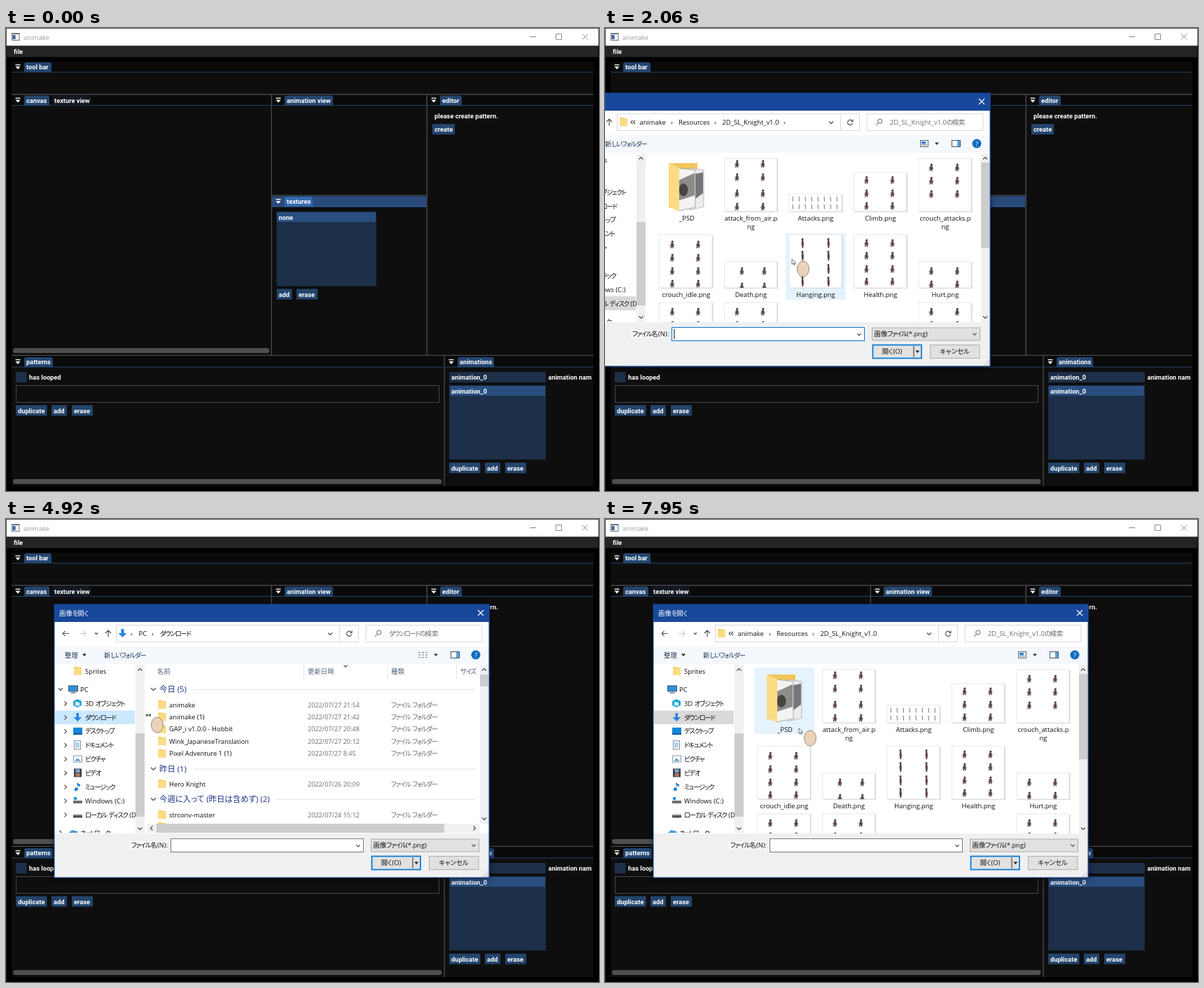
These frames come from a looping animation (847 by 661 pixels, 8000 ms). An HTML page:

```html
<!DOCTYPE html>
<html lang="ja">
<head>
<meta charset="utf-8">
<title>animake</title>
<style>
html, body { margin: 0; width: 100%; height: 100%; overflow: hidden; background: #000; }
svg#stage { display: block; width: 100vw; height: 100vh; }
text { font: 9.4px 'Open Sans', 'Noto Sans CJK JP', 'Noto Sans CJK', sans-serif; font-feature-settings: 'palt'; fill: #111; white-space: pre; }
.ui text { font: 600 9.25px Roboto, sans-serif; fill: #fff; }
.kana { letter-spacing: -1.2px; }
.group .kana, .mid .kana { letter-spacing: 0; }
text.grey { fill: #6d6d6d; }
text.date { fill: #6d6d6d; font-size: 9.1px; }
text.head { fill: #4c607a; }
text.group { fill: #1e3287; font-size: 11.4px; }
text.bar { fill: #1e395b; }
text.white { fill: #fff; }
.mid { text-anchor: middle; }
.end { text-anchor: end; }
.line { fill: none; stroke: #444; stroke-width: 1.1; }

.step { animation: 8s step-end infinite; }
.off { opacity: 0; }
#cursor { animation: travel 8s ease-in-out infinite; }
#drag { animation: drag 8s ease-in-out infinite; }
#dialog { transform-origin: 379.5px 317px; animation: open 8s linear infinite; }
#pointer { animation-name: appear; }
#ring { animation-name: press; }
#arrow { animation-name: arrow; }
#resize { animation-name: resize; }
#addHover { animation-name: addHover; }
#content { animation-name: content; }
#thumbs, #scroll { animation-name: thumbs; }
#details { animation-name: details; }
#downloads { animation-name: downloads; }
#animake { animation-name: animake; }
#resources { animation-name: resources; }
#tile { animation-name: tile; }
#row { animation-name: row; }
#caret { animation-name: caret; }
#field { animation-name: field; }
#disk, #trail { animation-name: leave; }
#dlRow { animation-name: dlRow; }
#chevrons { animation-name: chevrons; }
.load0 { animation-name: load0; }
.load1 { animation-name: load1; }
.load2 { animation-name: load2; }

@keyframes travel {
  0%, 3.25% { transform: translate(748px, 625px); }
  11.5%, 23.75% { transform: translate(402px, 384px); }
  25.75% { transform: translate(267px, 330px); }
  28.5% { transform: translate(30px, 276px); }
  32%, 34.5% { transform: translate(78px, 300px); }
  39%, 42% { transform: translate(92px, 105px); }
  43.125% { transform: translate(101px, 105px); }
  44% { transform: translate(127px, 112px); }
  49%, 51% { transform: translate(232px, 134px); }
  54.5% { transform: translate(150px, 240px); }
  56.5%, 58.5% { transform: translate(140px, 283px); }
  61.5% { transform: translate(200px, 280px); }
  67%, 70% { transform: translate(250px, 266px); }
  74.5%, 78% { transform: translate(252px, 243px); }
  84% { transform: translate(262px, 253px); }
  86.5%, 89% { transform: translate(262px, 244px); }
  96%, 100% { transform: translate(277px, 299px); }
}
@keyframes drag {
  0%, 42% { transform: translate(-140px, -29px); }
  43.125% { transform: translate(-131px, -29px); }
  44% { transform: translate(-105px, -22px); }
  49%, 100% { transform: none; }
}
@keyframes open {
  0%, 17.5% { opacity: 0; transform: scale(.95); }
  18.875% { opacity: .75; transform: scale(.987); }
  20%, 100% { opacity: 1; transform: scale(1); }
}
@keyframes appear { 3.25% { opacity: 1; } }
@keyframes press {
  13.5% { opacity: .75; } 14.75% { opacity: 0; }
  40.6% { opacity: .75; } 50.6% { opacity: 0; }
  56.75% { opacity: .75; } 58% { opacity: 0; }
  67.25% { opacity: .75; } 69% { opacity: 0; }
  76% { opacity: .75; } 77.75% { opacity: 0; }
  87% { opacity: .75; } 88.75% { opacity: 0; }
}
@keyframes arrow { 60.8% { opacity: 0; } 62.3% { opacity: 1; } }
@keyframes resize { 60.8% { opacity: 1; } 62.3% { opacity: 0; } }
@keyframes addHover { 11.2% { opacity: 1; } }
@keyframes content { 21.25% { opacity: 1; } }
@keyframes thumbs { 58.75% { opacity: 0; } 90% { opacity: 1; } }
@keyframes details { 58.75% { opacity: 1; } 90% { opacity: 0; } }
@keyframes downloads { 58.75% { opacity: 1; } 70.625% { opacity: 0; } }
@keyframes animake { 70.625% { opacity: 1; } 78.75% { opacity: 0; } }
@keyframes resources { 78.75% { opacity: 1; } 90% { opacity: 0; } }
@keyframes tile {
  23.125% { opacity: 1; transform: translate(277.5px, 110px); }
  24.5% { transform: translate(185px, 110px); }
  26.5% { transform: translate(92.5px, 110px); }
  27.25% { transform: translate(0, 110px); }
  28% { opacity: 0; }
  31.5% { opacity: 1; }
  35% { opacity: 0; }
  93.5% { opacity: 1; transform: none; }
}
@keyframes row {
  64.4% { opacity: 1; transform: translateY(23px); }
  70.625% { opacity: 0; transform: none; }
  71.3% { opacity: 1; }
  83% { transform: translateY(17.4px); }
  85.5% { transform: none; }
  90% { opacity: 0; }
}
@keyframes caret { 23.125% { opacity: 1; } 29.75% { opacity: 0; } 36.375% { opacity: 1; } 43% { opacity: 0; } }
@keyframes field { 57% { stroke: #7a7a7a; } }
@keyframes leave { 57% { opacity: 0; } }
@keyframes dlRow { 57% { opacity: 1; fill: #cce8ff; } 67.5% { fill: #d9d9d9; } }
@keyframes chevrons { 53% { opacity: 1; } 74.5% { opacity: 0; } }
@keyframes load0 { 58.75% { opacity: 0; } 96.75% { opacity: 1; } }
@keyframes load1 { 58.75% { opacity: 0; } 97.6% { opacity: 1; } }
@keyframes load2 { 58.75% { opacity: 0; } 98.5% { opacity: 1; } }
</style>
</head>
<body>
<svg id="stage" viewBox="0 0 847 661">
  <defs>
    <g id="folder"><path d="M0 0h5l1 1h5v11H0z" fill="#f5cd62"/><path d="M0 2h11v10H0z" fill="#fbdc85"/></g>
    <g id="knight">
      <path d="M-1.5-2.500h3l1 3.500-1 4.500h-1l-.5-2.500-1.500 2.500h-1z" fill="#5a4a4e"/>
      <circle cx=".3" cy="-4" r="1.6" fill="#3d3c44"/>
      <path d="M-1.500-1l-1.500 3" stroke="#a8504a"/>
      <path d="M1.500 0l2.500 2" stroke="#9a9ea6" stroke-width=".8"/>
    </g>
    <g id="tall">
      <path d="M-1-4h2.200l.8 5-.8 6h-1.700l-1-6z" fill="#5a4a4e"/>
      <circle cy="-5.500" r="1.500" fill="#3d3c44"/>
      <path d="M1.500-1v4" stroke="#a8504a" stroke-width=".8"/>
    </g>
    <g id="slim"><path d="M0-3.500L.5 3.500" stroke="#77747b"/></g>
    <clipPath id="navClip"><path d="M70 207h115v241H70z"/></clipPath>
    <clipPath id="listClip"><path d="M199 207h490v242H199z"/></clipPath>
    <clipPath id="rowsClip"><path d="M199 229h478v206H199z"/></clipPath>
  </defs>
  <g id="app" class="ui"></g>
  <g id="drag"><g id="dialog"></g></g>
  <g id="cursor"><g id="pointer" class="step off">
    <circle id="ring" class="step off" r="10" fill="#e3d829"/>
    <ellipse cx="16" cy="14" rx="8.5" ry="11" fill="#ead3ba" stroke="#8b6c64" stroke-width=".8"/>
    <path id="arrow" class="step" d="M0 0v7.6l1.9-1.7 1.3 2.6 1.1-.6-1.2-2.4 2.5-.3z" fill="#fff" stroke="#333" stroke-width=".7"/>
    <path id="resize" class="step off" d="M0 0h7M2-2L0 0 2 2M5-2L7 0 5 2" fill="none" stroke="#222"/>
  </g></g>
</svg>
<script>
const $ = id => document.getElementById(id);
const rect = (x, y, w, h, fill, more = '') => `<rect x="${x}" y="${y}" width="${w}" height="${h}" fill="${fill}" ${more}/>`;
const tighten = s => s.replace(/[ぁ-ー]+/g, run => `<tspan class="kana">${run}</tspan>`);
const text = (x, y, s, cls = '') => `<text x="${x}" y="${y}" class="${cls}">${tighten(s)}</text>`;
const line = (d, more = '') => `<path class="line" d="${d}" ${more}/>`;
const tri = (x, y, c = '#222') => `<path d="M${x - 3} ${y - 1.5}h6l-3 3.5z" fill="${c}"/>`;
const down = (x, y, s = 3) => line(`M${x - s} ${y - s / 2}l${s} ${s}l${s} ${-s}`);
const up = (x, y, s = 3) => line(`M${x - s} ${y + s / 2}l${s} ${-s}l${s} ${s}`);
const left = (x, y) => line(`M${x + 1.5} ${y - 3}l-3 3l3 3`);
const right = (x, y) => line(`M${x - 1.5} ${y - 3}l3 3l-3 3`);
const folder = (x, y) => `<use href="#folder" x="${x}" y="${y}"/>`;
const step = (id, body, cls = '') => `<g id="${id}" class="step ${cls}">${body}</g>`;

/* main window */
const BUTTON = '#23456d', FRAME = '#1d2f49', PICK = '#284f80', SEP = '#45454d';
const button = (x, y, w, s) => rect(x, y, w, 15, BUTTON) + text(x + 3, y + 11, s);
const tab = (x, y, w, s, fill = '#23466f') =>
  `<path d="M${x} ${y + 14}v-11q0-3 3-3h${w - 6}q3 0 3 3v11z" fill="${fill}"/>` + text(x + 3, y + 10.3, s);
const panel = (x, y, w, h, tabW, title, focus) =>
  rect(x, y, w, h, '#0e0e0e') + rect(x, y, w, 15, focus ? '#294a7a' : '#0a0a0a') +
  rect(x, y + 14.5, w, 1, focus ? '#3369ad' : '#23426b') +
  rect(x + 5.5, y + 4, 7, 1.3, '#fff') + `<path d="M${x + 5.5} ${y + 7}h7l-3.5 4z" fill="#fff"/>` +
  tab(x + 18, y + 1, tabW, title, focus ? '#3369ad' : '#23466f');
const grab = (x, y, w) => rect(x, y, w, 7, '#4f4f4f', 'rx="3.5"');

$('app').innerHTML =
  rect(0, 0, 847, 661, '#000') + rect(0, 0, 1, 661, '#1a2230') + rect(0, 0, 847, 25.5, '#555') + rect(1, 1, 845, 24.5, '#fff') +
  rect(8, 7, 11.5, 11, '#6f7680') + rect(9, 9, 9.5, 8, '#f3f5f7') + rect(9.5, 10, 4, 6, '#3b5f93') +
  `<text x="25" y="16.5" style="font:9.3px 'Open Sans',sans-serif;fill:#999">animake</text>` +
  line('M748 12.5h9M785.5 8.5h8v8h-8zM823 8.5l8 8M831 8.5l-8 8', 'style="stroke:#8a8a8a;stroke-width:1"') +
  rect(1, 25.5, 845, 16, '#242424') + text(11, 37.2, 'file') +
  panel(8, 48, 831, 46, 39, 'tool bar') +
  panel(8, 95.5, 370.5, 371, 36, 'canvas') + tab(66, 96.5, 56, 'texture view', '#121720') +
  panel(380, 95.5, 220.5, 142, 69, 'animation view') +
  panel(602, 95.5, 237, 371, 31, 'editor') +
  panel(380, 240, 220.5, 226.5, 40, 'textures', true) +
  panel(8, 469, 617, 185, 41, 'patterns') +
  panel(627, 469, 212, 185, 52, 'animations') +
  rect(8, 94, 831, 1.5, SEP) + rect(8, 466.7, 831, 1.5, SEP) + rect(378.5, 95, 1.5, 372, SEP) +
  rect(600.5, 95, 1.5, 372, SEP) + rect(380, 238, 220.5, 1.5, SEP) + rect(625.3, 468, 1.5, 186, SEP) +
  grab(10, 457, 366) + grab(10, 644, 612.5) +
  text(612, 129, 'please create pattern.') + button(609, 137, 32, 'create') +
  rect(386.5, 262, 142.5, 106.5, FRAME) + rect(387, 263, 141, 14, PICK) + text(389.5, 273.5, 'none') +
  button(386.5, 372.5, 22, 'add') + step('addHover', rect(386.5, 372.5, 22, 15, '#4296fa') + text(389.5, 383.5, 'add'), 'off') +
  button(415, 372.5, 30, 'erase') +
  rect(14, 491, 15.5, 15, FRAME) + text(33, 502.3, 'has looped') +
  rect(14.5, 510.5, 604, 24, 'none', `stroke="${SEP}"`) +
  button(14, 538.5, 44.5, 'duplicate') + button(65, 538.5, 22, 'add') + button(94, 538.5, 30, 'erase') +
  rect(633, 491, 138, 15, FRAME) + text(636, 502.3, 'animation_0') + text(774.5, 502.3, 'animation nam') +
  rect(633, 510, 138, 106, FRAME) + rect(634, 511, 136, 14, PICK) + text(636, 521.7, 'animation_0') +
  button(633, 620.5, 44.5, 'duplicate') + button(684, 620.5, 22, 'add') + button(713, 620.5, 30, 'erase');

/* file dialog */
const KIND = 'ファイル フォルダー';
const fileRow = (y, name, date) => folder(217.5, y - 6) + text(233, y + 3.5, name) +
  text(431, y + 3.5, date, 'date') + text(550, y + 3.5, KIND, 'grey');
const groupRow = (y, name, x) => down(210.5, y, 3.5) + text(219, y + 4.2, name, 'group') + rect(x, y, 670 - x, 1, '#e2e2e2');
const search = name => text(547, 167, name + 'の検索', 'grey');
const crumbs = parts => parts.map(([x, s]) => text(x, 167, s)).join('');
const bar = (x, y, w, h) => rect(x, y, w, h, '#cdcdcd');
const listIcon = line('M589 190.5h3M589 194h3M589 197.5h3M594 190.5h3M594 194h3M594 197.5h3M599 190.5h3M599 194h3M599 197.5h3', 'style="stroke:#777"');
const thumbIcon = rect(590.5, 189.5, 11, 9, '#fff', 'stroke="#567"') + rect(592, 191, 6, 3.5, '#2f7fd0') + rect(592, 195.5, 8, 1, '#567');

const navIcons = {
  folder: folder(1, 0),
  pc: rect(0, 1, 13, 8, '#2d8fdc', 'stroke="#456"') + rect(3, 10.5, 7, 1.2, '#456'),
  cube: '<path d="M0 3l6-3 6 3v6l-6 3-6-3z" fill="#29a9dc"/><path d="M3 4l6 1v5l-6-1z" fill="#d7f2fb"/>',
  arrow: '<path d="M4.5 0h3.5v6h4l-5.8 6-5.700-6h4z" fill="#2b83dc"/>',
  desk: rect(0, 1, 13, 10, '#1787d8') + rect(0, 9, 13, 2, '#0c5b9c'),
  doc: rect(1.5, 0, 9, 12, '#fff', 'stroke="#889"') + rect(3, 3, 6, 1, '#39c') + rect(3, 5.5, 6, 1, '#39c') + rect(3, 8, 6, 1, '#39c'),
  pic: rect(.5, 1.5, 12, 9, '#fff', 'stroke="#899"') + '<path d="M2 9l4-4 5 4z" fill="#5b9bd0"/>',
  film: rect(1, 0, 11, 12, '#3b3f4a') + rect(3.5, 1, 6, 4.5, '#7ea9cf') + rect(3.5, 6.5, 6, 4.5, '#b27b5d'),
  note: '<path d="M5 0l5 3v3L6.5 4v5" fill="#1d7fdc"/><circle cx="4.3" cy="9.5" r="2.5" fill="#1d7fdc"/>',
  sys: rect(0, 6, 13, 4, '#6b7077') + rect(1, 1, 4, 4, '#1e90e0'),
  disk: rect(0, 5, 13, 3, '#c3c6ca') + rect(0, 7, 13, 3.5, '#4e5257'),
  net: '<path d="M0 6l5-4 8 2v6H2z" fill="#4c9ad8"/>'
};
const nav = [
  [217, 'Sprites', 'folder'], [243, 'PC', 'pc', 1], [263, '3D オブジェクト', 'cube'], [283, 'ダウンロード', 'arrow'],
  [302.8, 'デスクトップ', 'desk'], [322.7, 'ドキュメント', 'doc'], [342.5, 'ピクチャ', 'pic'], [362.4, 'ビデオ', 'film'],
  [382.2, 'ミュージック', 'note'], [402, 'Windows (C:)', 'sys'], [422, 'ローカル ディスク (D:)', 'disk'], [448, 'ネットワーク', 'net', 1]
].map(([y, s, icon, top]) => `<g transform="translate(${top ? 89.5 : 96} ${y - 6})">${navIcons[icon]}</g>` +
  text(top ? 106 : 113, y + 3.5, s)).join('');
const navChevrons = down(78, 243) + [0, 1, 2, 3, 4, 5, 6, 7, 8].map(i => right(85, 263.5 + i * 19.85)).join('') + right(78, 448);

/* thumbnails: column, row, height, sprite columns, sprite rows, sprite, label lines */
const two = [18, 55];
const files = [
  [1, 0, 76, two, [8, 27, 50, 69], 'knight', 'attack_from_air.p', 'ng'],
  [2, 0, 25, [5, 14, 23, 32, 41, 50, 59, 68], [7, 18], 'slim', 'Attacks.png'],
  [3, 0, 56, two, [11, 30, 48], 'knight', 'Climb.png'],
  [4, 0, 76, two, [13, 32, 51], 'knight', 'crouch_attacks.p', 'ng'],
  [0, 1, 76, two, [14, 33, 52, 70], 'knight', 'crouch_idle.png'],
  [1, 1, 38, [25, 57], [14, 36], 'knight', 'Death.png'],
  [2, 1, 76, [19, 56], [12, 30, 49, 67], 'tall', 'Hanging.png'],
  [3, 1, 76, two, [12, 30, 49, 67], 'knight', 'Health.png'],
  [4, 1, 38, two, [14, 33], 'knight', 'Hurt.png'],
  [0, 2, 76, two, [13, 32], 'knight', ''],
  [1, 2, 76, two, [13, 32], 'knight', ''],
  [4, 2, 76, two, [13, 32], 'knight', '']
];
const thumbs = files.map(([c, r, h, xs, ys, sprite, a, b], i) => {
  const x = 218 + c * 92.5, bottom = [291, 400, 497][r];
  const art = ys.map(y => xs.map(sx => `<use href="#${sprite}" x="${sx}" y="${y}"/>`).join('')).join('');
  return `<g class="step load${i % 3}">` + rect(x + 1, bottom - h + 1, 75.5, h, '#d5d5d5') +
    rect(x, bottom - h, 75, h, '#fff', 'stroke="#e2e2e2" stroke-width=".8"') +
    `<svg x="${x}" y="${bottom - h}" width="75" height="${h}">${art}</svg></g>` +
    text(x + 38, bottom + 12.5, a, 'mid') + (b ? text(x + 38, bottom + 24.8, b, 'mid') : '');
}).join('');
const psd =
  '<path d="M231 222h41v64h-41z" fill="#f2c65a"/>' +
  '<path d="M261 229l20 3v52l-20 5z" fill="#ececec" stroke="#aaa" stroke-width=".8"/><path d="M266 238l14-3v30l-14 10z" fill="#77767a"/>' +
  '<path d="M245 229l24 3v53l-24 5z" fill="#f3f3f3" stroke="#999" stroke-width=".8"/><path d="M246 246l22-10v32l-22 7z" fill="#8f8c8a"/>' +
  '<ellipse cx="252" cy="260" rx="6.5" ry="9" fill="#4a4440"/>' +
  '<path d="M231 222l15 6v63l-15-7z" fill="#fbdc85"/>' + text(257, 303.5, '_PSD', 'mid');

const thumbView =
  folder(161, 157) + line('M179.500 161l-2.500 2.500 2.500 2.500M183 161l-2.500 2.500 2.500 2.500') +
  crumbs([[189.5, 'animake'], [234, '›'], [245, 'Resources'], [296, '›'], [307.5, '2D_SL_Knight_v1.0']]) +
  step('trail', text(395, 167, '›')) + search('2D_SL_Knight_v1.0') + thumbIcon +
  `<g clip-path="url(#listClip)">${rect(213, 212, 86, 95, '#e5f3ff', 'id="tile" class="step off"')}${psd}${thumbs}</g>`;

const detailsView =
  listIcon + rect(213, 233, 475, 18, '#e5f3ff', 'id="row" class="step off"') +
  text(216, 221, '名前', 'head') + text(431, 221, '更新日時', 'head') + text(550, 221, '種類', 'head') + text(649, 221, 'サイズ', 'head') +
  [425, 544.5, 643].map(x => rect(x, 208, 1, 21, '#e3e3e3')).join('');
const downloads =
  '<path d="M164.5 157h4v6h4l-6 6-6-6h4z" fill="#2b83dc"/>' + crumbs([[178, '›'], [189.5, 'PC'], [208, '›'], [220, 'ダウンロード']]) + search('ダウンロード') +
  down(485, 210, 2.5) + '<g clip-path="url(#rowsClip)">' + groupRow(243, '今日 (5)', 268) +
  fileRow(265, 'animake', '2022/07/27 21:54') + fileRow(282.3, 'animake (1)', '2022/07/27 21:42') +
  fileRow(299.6, 'GAP_i v1.0.0 - Hobbit', '2022/07/27 20:48') + fileRow(317, 'Wink_JapaneseTranslation', '2022/07/27 20:12') +
  fileRow(334.4, 'Pixel Adventure 1 (1)', '2022/07/27 8:45') + groupRow(356.5, '昨日 (1)', 268) +
  fileRow(378, 'Hero Knight', '2022/07/26 20:09') + groupRow(400, '今週に入って (昨日は含めず) (2)', 386) +
  fileRow(422, 'strconv-master', '2022/07/24 15:12') + folder(217.5, 433) + '</g>' +
  rect(677, 208, 12, 227, '#f0f0f0') + bar(677, 222, 12, 17) + up(683, 215) + down(683, 428) +
  rect(202, 435, 475, 13, '#f0f0f0') + bar(215, 435, 411, 13) + left(208, 441.5) + right(669, 441.5);
const wide = rect(202, 435, 487, 13, '#f0f0f0') + bar(215, 435, 436, 13) + left(208, 441.5) + right(683, 441.5) + up(318, 210, 2.5);
const base = [[178, '›'], [189.5, 'PC'], [208, '›'], [220, 'ダウンロード'], [270, '›'], [282, 'animake']];
const animake = folder(161, 157) + crumbs(base) + search('animake') + wide + fileRow(242, 'Resources', '2022/07/27 21:54');
const resources = folder(161, 157) + crumbs([...base, [326, '›'], [337, 'Resources'], [389, '›']]) + search('Resources') + wide +
  ['2D_SL_Knight_v1.0', 'freeknight', 'Hero Knight'].map((s, i) => fileRow(242 + i * 17.4, s, '2022/07/27 21:54')).join('');

const chrome =
  line('M90 163.5h-9M84.5 160l-3.5 3.5 3.5 3.5', 'style="stroke:#4a6078"') +
  line('M105 163.5h9M110.5 160l3.5 3.5-3.5 3.5', 'style="stroke:#ccc"') + down(129, 163.5, 2) +
  line('M146 168.5v-9M142 163l4-4 4 4') +
  rect(157.5, 151.5, 346, 24, 'none', 'stroke="#d9d9d9"') + rect(476, 152, 1, 23, '#d9d9d9') + down(463, 164) +
  line('M493 161.5a3.6 3.6 0 1 0 .7 3M494 159.5v3h-3') +
  rect(514, 151.5, 166, 24, 'none', 'stroke="#d9d9d9"') + line('M530.5 164l-3.5 4M530.5 164a3 3 0 1 1 2 1z', 'style="stroke:#777"') +
  rect(70, 182, 619, 25, '#f5f8fc') + text(84, 197.7, '整理', 'bar') + tri(112, 194) + text(140, 197.7, '新しいフォルダー', 'bar') +
  tri(614, 194, '#1e395b') + rect(635.5, 189.5, 12, 9, '#fff', 'stroke="#456"') + rect(643, 190, 4, 8, '#5aa7e0') +
  '<circle cx="671" cy="194" r="6.5" fill="#0b6cc0"/>' + text(671, 197.6, '?', 'white mid');
const footer =
  text(231, 469.3, 'ファイル名(N):', 'end') +
  rect(235.5, 456.5, 275, 19, '#fff', 'id="field" class="step" stroke="#0078d7"') + rect(238.5, 459, 1, 14, '#000', 'id="caret" class="step off"') + down(503, 466.5, 2.7) +
  rect(521.5, 457, 154, 18, '#e1e1e1', 'stroke="#adadad"') + text(524.5, 469.3, '画像ファイル(*.png)') + down(668, 466, 2.7) +
  rect(522.5, 481.5, 69.5, 19, '#e1e1e1', 'stroke="#0078d7" stroke-width="1.7"') + rect(580.5, 483, 1, 16, '#333') + tri(586.3, 491) + text(550, 494.3, '開く(O)', 'mid') +
  rect(604.5, 481.5, 70.5, 19, '#e1e1e1', 'stroke="#adadad"') + text(639.5, 494.3, 'キャンセル', 'mid') +
  [[687, 503], [687, 506], [687, 509], [684, 506], [684, 509], [681, 509]].map(([x, y]) => rect(x, y, 1.5, 1.5, '#b5b5b5')).join('');

$('dialog').innerHTML =
  rect(68.5, 121.4, 622.3, 391, '#17489b', 'style="filter:drop-shadow(0 2px 4px rgba(0,0,0,.5))"') +
  rect(69.5, 147, 620, 302, '#fff') + rect(69.5, 449, 620, 62.4, '#f0f0f0') +
  rect(236, 457, 275, 18, '#f9f9f9') + rect(521, 457, 155, 18, '#f9f9f9') + rect(522, 481, 70, 19, '#f9f9f9') + rect(604, 481, 71, 19, '#f9f9f9') + rect(176, 460, 55, 12, '#f7f7f7') +
  line('M674 130l8 8M682 130l-8 8', 'style="stroke:#fff"') +
  rect(185, 208, 13, 240, '#f0f0f0') + bar(185, 306, 13, 119) + up(191.5, 215) + down(191.5, 442) +
  step('scroll', rect(677, 208, 12, 241, '#f0f0f0') + bar(677, 221, 12, 122) + up(683, 215) + down(683, 442)) +
  step('content',
    text(76, 137.5, '画像を開く', 'white') + chrome +
    rect(70, 412, 114, 20, '#d9d9d9', 'id="disk" class="step"') + rect(70, 273.5, 114, 19.5, '#cce8ff', 'id="dlRow" class="step off"') +
    `<g clip-path="url(#navClip)">${nav}${step('chevrons', navChevrons, 'off')}</g>` +
    step('thumbs', thumbView) +
    step('details', detailsView + step('downloads', downloads, 'off') + step('animake', animake, 'off') + step('resources', resources, 'off'), 'off') +
    footer, 'off');
</script>
</body>
</html>
```
